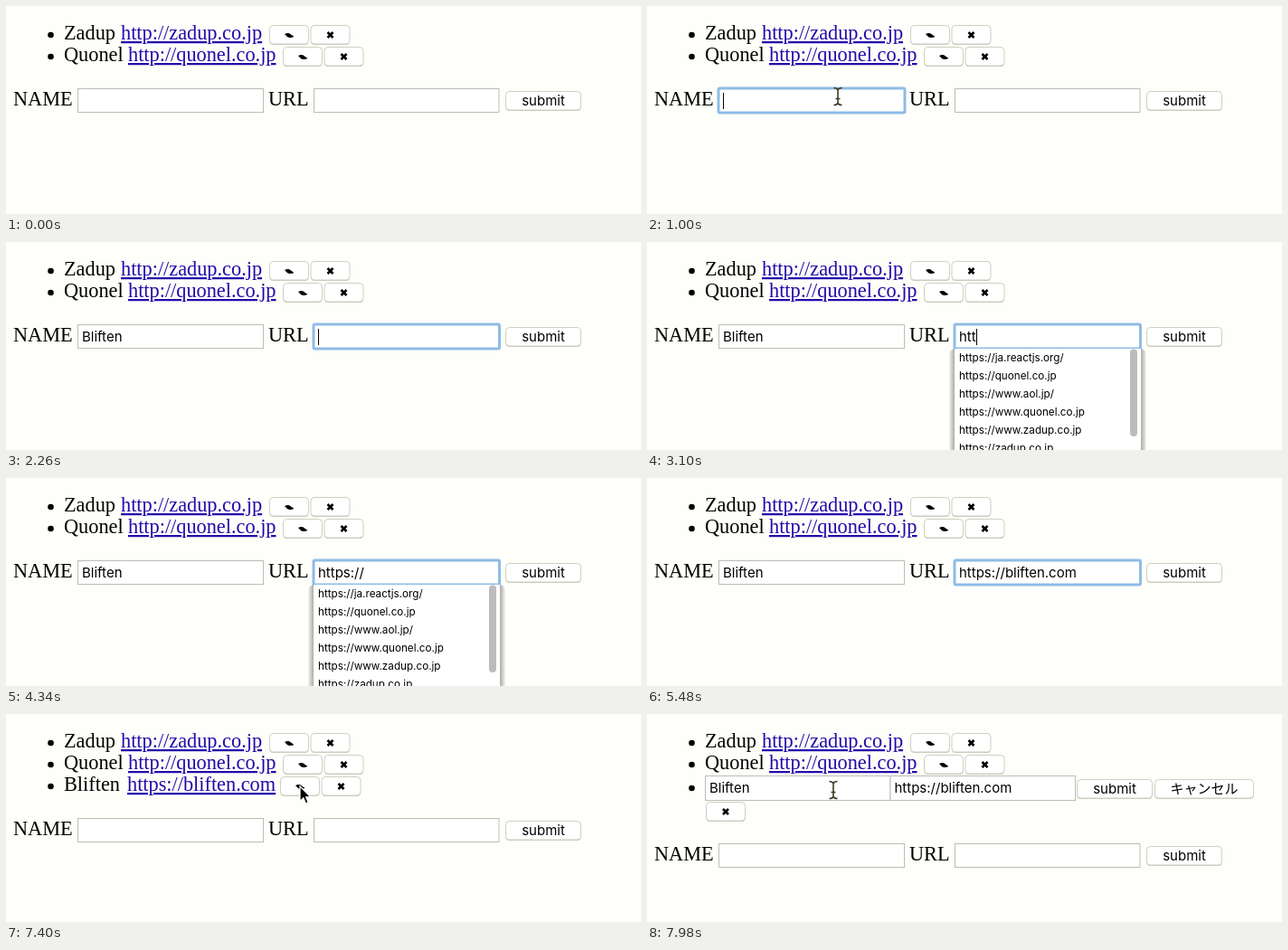
Recreate the animation shown at these times as an HTML page. Size 702 by 230 pixels, loop 8 s.

```html
<!DOCTYPE html>
<html lang="ja">
<head>
<meta charset="utf-8">
<title>Link list</title>
<style>
  html, body { margin: 0; width: 100%; height: 100%; overflow: hidden; background: #fefefa; }
  svg { display: block; width: 702px; height: 230px; }
  text { white-space: pre; fill: #000; }
  .page { font: 22.3px "Liberation Serif", Times, serif; }
  .link { fill: #2209ab; text-decoration: underline; text-decoration-thickness: 1px; }
  .ui { font: 15px Inter, "Noto Sans CJK JP", sans-serif; }
  .hint { font: 11.7px Inter, sans-serif; }
  .mid { text-anchor: middle; }
</style>
</head>
<body>
<svg id="stage" viewBox="0 0 702 230"></svg>
<script>
const LOOP = 8000;
const stage = document.getElementById('stage');

const NAME = 'Bliften', SCHEME = 'https://', HOST = 'bliften.com';
const rows = [
  { name: 'Zadup', url: 'http://zadup.co.jp', urlX: 127, penX: 291.5 },
  { name: 'Quonel', url: 'http://quonel.co.jp', urlX: 135, penX: 306.5 },
  { name: NAME, url: SCHEME + HOST, urlX: 134, penX: 303.5 }
];
const hints = ['ja.reactjs.org/', 'quonel.co.jp', 'www.aol.jp/',
  'www.quonel.co.jp', 'www.zadup.co.jp', 'zadup.co.jp'];

// Moments of the user's actions, in ms
const at = { focusName: 960, tab: 2260, submit: 5900, blur: 6480, edit: 7420 };
const typing = {
  name: { start: 1250, gap: 140, text: NAME },
  scheme: { start: 2640, gap: 170, text: SCHEME },
  host: { start: 4400, gap: 58, text: HOST }
};

// Pointer paths: time, x, y, shape
const paths = [
  [[20, 700, 4, 'arrow'], [220, 560, 60, 'arrow'], [480, 280, 140, 'arrow'],
   [720, 90, 152, 'arrow'], [820, 56, 158, 'arrow'], [880, 90, 135, 'arrow'],
   [920, 170, 108, 'beam'], [960, 211, 100, 'beam'], [1250, 211, 100, 'beam']],
  [[6420, 213, 128, 'beam'], [6560, 214, 112, 'arrow'], [6620, 215, 90, 'hand'],
   [6700, 216, 79, 'hand'], [6800, 216, 79, 'hand'], [7000, 290, 77, 'arrow'],
   [7160, 325, 80, 'arrow'], [7480, 325, 80, 'arrow'], [7620, 268, 82, 'beam'],
   [7820, 206, 84, 'beam'], [8000, 206, 84, 'beam']]
];

const label = (x, y, s, cls) => `<text x="${x}" y="${y}" class="${cls}">${s}</text>`;

function typed({ start, gap, text }, t) {
  const n = t < start ? 0 : Math.min(text.length, Math.floor((t - start) / gap) + 1);
  return { text: text.slice(0, n), last: n ? start + (n - 1) * gap : 0 };
}

function button(x, y, w, content) {
  return `<rect x="${x}" y="${y + 1}" width="${w}" height="20.5" rx="4" fill="#c9c9bd"/>
    <rect x="${x}" y="${y}" width="${w}" height="20.5" rx="4" fill="#fff" stroke="#cfcfc2"/>${content}`;
}

const textButton = (x, y, w, s) => button(x, y, w, label(x + w / 2, y + 15.5, s, 'ui mid'));

function penButton(x, y) {
  const cx = x + 21.5, cy = y + 11;
  return button(x, y, 43, `<path d="M${cx - 5} ${cy - 1.5}q4 -2 7 .4l3.5 2.6q-4 1.6 -7 .6z"/>`);
}

function crossButton(x, y) {
  const cx = x + 21.5, cy = y + 10.5;
  return button(x, y, 43, `<path d="M${cx - 3} ${cy - 3}l6 6m0 -6l-6 6" stroke="#000" stroke-width="2.6"/>`);
}

function field(x, y, w, h, s, focus) {
  const ring = focus
    ? `<rect x="${x - .5}" y="${y - .5}" width="${w + 1}" height="${h + 1}" rx="1.5" fill="none" stroke="#8fbce6" stroke-width="3"/>`
    : '';
  return `<rect x="${x}" y="${y}" width="${w}" height="${h}" fill="#fff" stroke="${focus ? '#8fb5d8' : '#bdbdb4'}"/>` +
    ring + label(x + 4.5, y + 18.5, s, 'ui');
}

function listRow(row, i) {
  const y = 37 + 24 * i, top = 21.5 + 24 * i;
  return `<circle cx="49.5" cy="${y - 5}" r="3.3"/>` +
    label(64, y, row.name, 'page') + label(row.urlX, y, row.url, 'page link') +
    penButton(row.penX, top) + crossButton(row.penX + 45.5, top);
}

function editRow(row) {
  return '<circle cx="49.5" cy="82" r="3.3"/>' +
    field(64.5, 68.5, 204.5, 27, row.name) + field(269, 68.5, 204.5, 27, row.url) +
    textButton(475.5, 72.5, 83, 'submit') + textButton(561.5, 72.5, 109, 'キャンセル') +
    crossButton(65.5, 97.5);
}

function form(dy, name, url, focus) {
  return label(8, 110 + dy, 'NAME', 'page') + label(290, 110 + dy, 'URL', 'page') +
    field(79.5, 91.5 + dy, 205, 26, name, focus === 'name') +
    field(340.5, 91.5 + dy, 204.5, 26, url, focus === 'url') +
    textButton(552.5, 94.5 + dy, 83, 'submit');
}

function dropdown() {
  let out = '';
  for (let i = 6; i > 0; i--) {
    out += `<rect x="${340 - i}" y="118" width="${206 + 2 * i}" height="130" rx="${i}" fill="#000" opacity=".06"/>`;
  }
  out += '<rect x="340" y="118" width="206" height="130" fill="#fff"/>';
  hints.forEach((h, i) => out += label(345, 132 + 20 * i, SCHEME + h, 'hint'));
  return out + '<rect x="534" y="118.5" width="8" height="96.5" rx="4" fill="#bcbcbc"/>';
}

const measure = document.createElement('canvas').getContext('2d');
function caret(x, y, s, age) {
  if (age % 1000 >= 500) return '';
  measure.font = '15px Inter, sans-serif';
  const cx = Math.round(x + measure.measureText(s).width) + .5;
  return `<path d="M${cx} ${y}v18" stroke="#000"/>`;
}

const shapes = {
  arrow: '<path d="M0 0v16.5l3.8 -3.6 2.6 6 2.8 -1.2 -2.6 -5.9h5.2z" stroke="#fff" stroke-width="1.2"/>',
  beam: '<path d="M-4.5 -9.5q3.5 0 4.5 2.2q1 -2.2 4.5 -2.2M0 -7.5v15M-4.5 9.5q3.5 0 4.5 -2.2q1 2.2 4.5 2.2M-2.5 2.5h5" ' +
    'fill="none" stroke="#3c3a24" stroke-width="1.6"/>',
  hand: '<path d="M-1.6 1.5q1.6 -2.6 3.4 0l1.7 6q1.4 -1.6 3 0q1.6 -1.2 2.8 .5q2.4 -.8 3 1.6l.6 4.8q0 2.4 -1.6 4.4v2.2' +
    'h-8.2l-5.6 -7.6q-3 -3.6 -.8 -4.4q1.6 -.4 4.2 2.6z" fill="#fff" stroke="#222" stroke-width="1.2"/>' +
    '<path d="M5 14.5v4m2.4 -4v4m2.4 -4v4" stroke="#222"/>'
};

function pointer(t) {
  const path = paths.find(p => t >= p[0][0] && t < p[p.length - 1][0]);
  if (!path) return '';
  const i = path.findIndex(k => k[0] > t);
  const [t0, x0, y0, shape] = path[i - 1], [t1, x1, y1] = path[i];
  const k = (t - t0) / (t1 - t0);
  const x = x0 + (x1 - x0) * k, y = y0 + (y1 - y0) * k;
  return `<g transform="translate(${x.toFixed(1)} ${y.toFixed(1)})">${shapes[shape]}</g>`;
}

function scene(t) {
  const added = t >= at.submit, editing = t >= at.edit;
  const name = typed(typing.name, t), scheme = typed(typing.scheme, t), host = typed(typing.host, t);
  const url = scheme.text + host.text;
  const focus = t < at.focusName || t >= at.blur ? '' : t < at.tab ? 'name' : 'url';
  const dy = editing ? 52 : added ? 24 : 0;

  let out = rows.slice(0, added && !editing ? 3 : 2).map(listRow).join('');
  if (editing) out += editRow(rows[2]);
  out += form(dy, added ? '' : name.text, added ? '' : url, focus);
  if (focus === 'name') {
    out += caret(84, 96, name.text, t - Math.max(at.focusName, name.last));
  } else if (focus === 'url') {
    const last = Math.max(at.tab, scheme.last, host.last, added ? at.submit : 0);
    out += caret(345, 96 + dy, added ? '' : url, t - last);
  }
  if (scheme.text && !host.text) out += dropdown();
  return out + pointer(t);
}

let shown = '';
function frame(now) {
  const next = scene(now % LOOP);
  if (next !== shown) stage.innerHTML = shown = next;
  requestAnimationFrame(frame);
}
frame(0);
</script>
</body>
</html>
```
